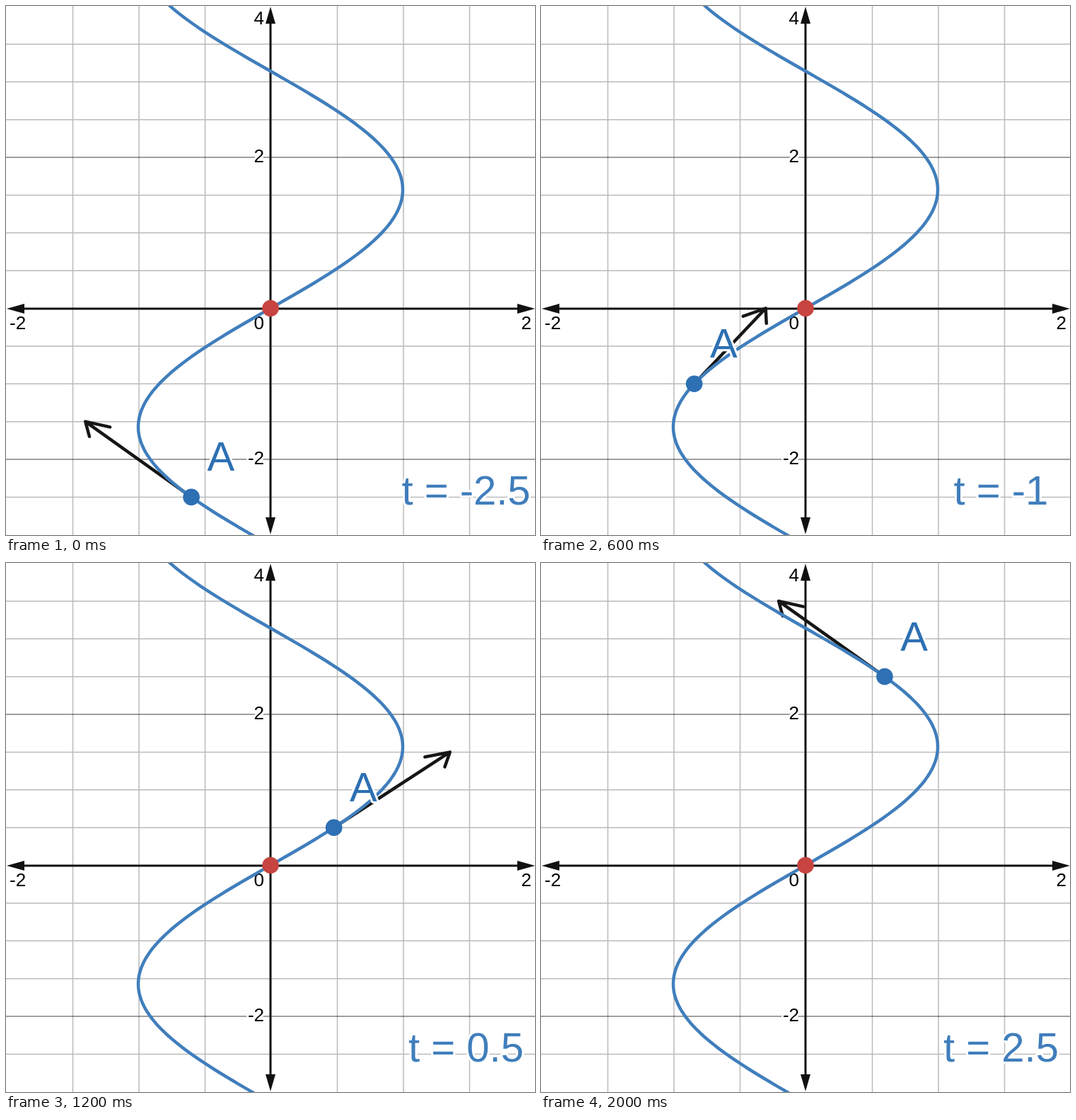
These frames come from a looping animation (748x748 px, 2500 ms). An HTML page:

```html
<!DOCTYPE html>
<html lang="en">
<head>
<meta charset="utf-8">
<title>Tangent vector on a curve</title>
<style>
  html, body { margin: 0; width: 100%; height: 100%; overflow: hidden; background: #fff; }
  svg { display: block; width: 100vw; height: 100vh; }
  text {
    font-family: "Liberation Sans", Arial, sans-serif;
    paint-order: stroke; stroke: #fff; stroke-width: 6; stroke-linejoin: round;
  }
  .tick { font-size: 26px; fill: #000; }
  .big { font-size: 58px; text-anchor: middle; }
  .end { text-anchor: end; }
</style>
</head>
<body>
<svg viewBox="0 0 748 748">
  <g fill="none" stroke="#000" stroke-width="1.5">
    <path id="minor" stroke-opacity=".27"/>
    <path id="major" stroke-opacity=".5"/>
  </g>
  <path d="M10 428H738M374 10V738" stroke="#111" stroke-width="3"/>
  <path d="M748 428l-25-7v14zM1 428l25-7v14zM374 1l-7 24h14zM374 747l-7-24h14z" fill="#111"/>
  <g class="tick">
    <text class="end" x="365" y="26">4</text>
    <text class="end" x="365" y="221">2</text>
    <text class="end" x="365" y="648">-2</text>
    <text class="end" x="365" y="457">0</text>
    <text x="5" y="457">-2</text>
    <text class="end" x="743" y="457">2</text>
  </g>
  <g fill="none" stroke-width="4.5" stroke-linecap="round" stroke-linejoin="round">
    <path id="arrow" stroke="#161616"/>
    <path id="curve" stroke="#407ebc"/>
  </g>
  <circle cx="374" cy="427.5" r="11.8" fill="#c74440"/>
  <circle id="dot" r="11.8" fill="#2d70b3"/>
  <text id="name" class="big" fill="#2d70b3">A</text>
  <text id="readout" class="big" x="650.5" y="705" fill="#407ebc"></text>
</svg>
<script>
const $ = id => document.getElementById(id);
const LOOP = 2500, STEP = 200, LAST = 10;
const px = x => 374 + 187 * x;
const py = y => 427.5 - 106.75 * y;
const pt = (x, y) => px(x).toFixed(2) + ' ' + py(y).toFixed(2);

function drawGrid() {
  let minor = '', major = '';
  for (let k = -3; k <= 3; k++) if (k) minor += `M${375 + 93.5 * k} 0V748`;
  for (let k = -5; k <= 7; k++) {
    if (!k) continue;
    const line = `M0 ${py(k / 2)}H748`;
    if (k % 4) minor += line; else major += line;
  }
  $('minor').setAttribute('d', minor);
  $('major').setAttribute('d', major);
}

function drawCurve() {
  const points = [];
  for (let y = -3.1; y < 4.15; y += 0.04) points.push(pt(Math.sin(y), y));
  $('curve').setAttribute('d', 'M' + points.join('L'));
}

function render(ms) {
  const t = -2.5 + Math.min(LAST, Math.floor(ms % LOOP / STEP)) / 2;
  const x = Math.sin(t), dx = Math.cos(t);
  const tipX = x + dx, tipY = t + 1;
  const back = Math.atan2(-1, -dx);
  const wing = turn => pt(tipX + 0.2 * Math.cos(back + turn), tipY + 0.2 * Math.sin(back + turn));
  const tip = pt(tipX, tipY), a = Math.PI / 6;

  $('arrow').setAttribute('d', `M${pt(x, t)}L${tip}M${wing(-a)}L${tip}L${wing(a)}`);
  $('dot').setAttribute('cx', px(x));
  $('dot').setAttribute('cy', py(t));
  $('name').setAttribute('x', px(x) + 41.8);
  $('name').setAttribute('y', py(t) - 37);
  $('readout').textContent = 't = ' + t;
}

drawGrid();
drawCurve();
render(0);
(function tick() {
  render(performance.now());
  requestAnimationFrame(tick);
})();
</script>
</body>
</html>
```
